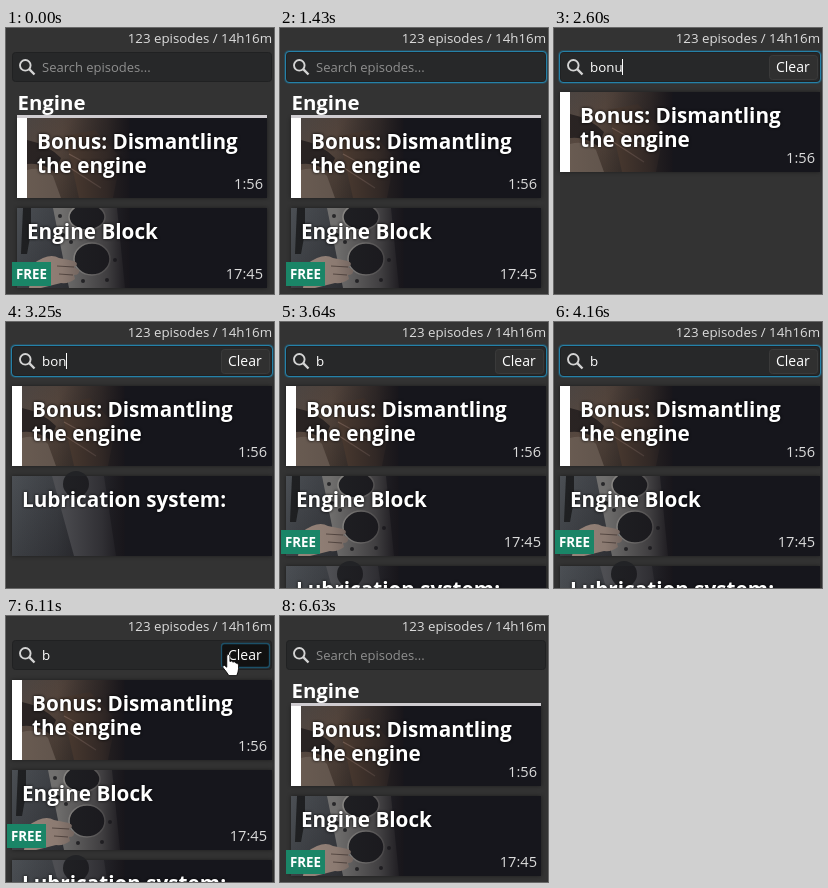
These frames come from a looping animation (268 by 266 pixels, 7.02 s). An HTML page:

```html
<!DOCTYPE html>
<html lang="en">
<head>
<meta charset="utf-8">
<title>Episode search</title>
<style>
html, body { margin: 0; width: 100%; height: 100%; overflow: hidden; background: #333; }
svg { display: block; width: 100vw; height: 100vh; }
text { font: 13.3px "Open Sans", "Noto Sans", sans-serif; fill: #dcdcdc; white-space: pre; }
.title { font-size: 20.7px; font-weight: 700; fill: #fff; filter: drop-shadow(0 0 1.5px #000); }
.time { font-size: 14.6px; text-anchor: end; }
.free { font-size: 13.3px; font-weight: 700; fill: #fff; }
.typed { fill: #fff; font-weight: 500; }
.clear { font-size: 14px; font-weight: 500; fill: #fff; }

/* Everything shares one 7020 ms clock and changes in hard steps. */
.t { animation: 7020ms step-end infinite; }
.home { animation-name: home; }
.results { animation-name: results; }
.block { animation-name: block; }
.lub { animation-name: lub; }
.third { animation-name: third; }
.o { animation-name: o; }
.n { animation-name: n; }
.u { animation-name: u; }
.caret { animation-name: caret, caret-x; }
.ring { animation-name: ring; }
.press { animation-name: press; }
.arrow { animation-name: arrow; }
.hand { animation-name: hand; }

@keyframes home { 0%, 88.88% { visibility: visible } 25.92% { visibility: hidden } }
@keyframes results { 0%, 88.88% { visibility: hidden } 25.92% { visibility: visible } }
@keyframes block { 0%, 88.88% { visibility: hidden } 51.85% { visibility: visible } }
@keyframes lub {
  0%, 88.88% { visibility: hidden; transform: translate(6px, 154px) }
  25.92%, 46.29% { visibility: visible; transform: translate(6px, 154px) }
  37.03% { visibility: hidden; transform: translate(6px, 154px) }
  51.85% { visibility: visible; transform: translate(6px, 244px) }
}
@keyframes third { 0%, 31.48%, 51.85% { visibility: hidden } 25.92%, 48.14% { visibility: visible } }
@keyframes o { 0%, 51.85% { visibility: hidden } 25.92% { visibility: visible } }
@keyframes n { 0%, 48.14% { visibility: hidden } 29.62% { visibility: visible } }
@keyframes u { 0%, 46.29% { visibility: hidden } 37.03% { visibility: visible } }
@keyframes caret {
  0%, 20.37%, 44.44%, 51.85%, 59.25%, 74.07%, 87.03% { opacity: 0 }
  12.96%, 25.92%, 46.29%, 53.7%, 66.66%, 81.48% { opacity: 1 }
}
@keyframes caret-x {
  0% { transform: translateX(36px) }
  25.92%, 48.14% { transform: translateX(52px) }
  29.62%, 46.29% { transform: translateX(60px) }
  37.03% { transform: translateX(68px) }
  51.85% { transform: translateX(44px) }
}
@keyframes ring { 0%, 87.03% { opacity: 0 } 12.96% { opacity: 1 } }
@keyframes press { 0%, 88.88% { opacity: 0 } 87.03% { opacity: 1 } }
@keyframes arrow {
  0%, 7.4% { opacity: 0; transform: translate(150px, -12px) }
  1.85% { opacity: 1; transform: translate(150px, -8px) }
  3.7% { opacity: 1; transform: translate(142px, 2px) }
  5.55% { opacity: 1; transform: translate(133px, 13px) }
}
@keyframes hand {
  0%, 88.88% { opacity: 0; transform: translate(216px, 37px) }
  81.48% { opacity: 1; transform: translate(250px, 112px) }
  83.33% { opacity: 1; transform: translate(232px, 66px) }
  85.18% { opacity: 1; transform: translate(218px, 40px) }
  87.03% { opacity: 1; transform: translate(216px, 37px) }
}
</style>
</head>
<body>
<svg viewBox="0 0 268 266" preserveAspectRatio="none">
  <defs>
    <linearGradient id="fade">
      <stop offset="0" stop-color="#18161b" stop-opacity="0"/>
      <stop offset=".4" stop-color="#18161b" stop-opacity=".12"/>
      <stop offset=".8" stop-color="#18161b" stop-opacity=".6"/>
      <stop offset="1" stop-color="#18161b"/>
    </linearGradient>
    <linearGradient id="wood" x2="1" y2=".5">
      <stop offset="0" stop-color="#4a4543"/>
      <stop offset=".4" stop-color="#5a4a40"/>
      <stop offset="1" stop-color="#3a3029"/>
    </linearGradient>
    <linearGradient id="steel" x2="1" y2=".6">
      <stop offset="0" stop-color="#4b4f54"/>
      <stop offset="1" stop-color="#2b2c30"/>
    </linearGradient>
    <clipPath id="photo"><rect width="112" height="80"/></clipPath>
    <filter id="shade" x="-10%" y="-20%" width="120%" height="140%">
      <feDropShadow dx="0" dy="0" stdDeviation="2" flood-opacity=".45"/>
    </filter>

    <g id="bonus-photo" clip-path="url(#photo)">
      <rect width="112" height="80" fill="url(#wood)"/>
      <path d="M10 22Q30 26 44 40L38 54Q24 44 10 46Z" fill="#2a2423"/>
      <path d="M10 80V52Q26 48 36 58L44 80Z" fill="#6b5d53"/>
      <path d="M48 18L78 12 104 40 96 80H62Z" fill="#574335"/>
      <path d="M44 44L84 70M52 36L92 58" stroke="#84695a" stroke-width="1.2"/>
    </g>
    <g id="block-photo" clip-path="url(#photo)">
      <rect width="112" height="80" fill="url(#steel)"/>
      <path d="M6 0H14V24L10 46H4Z" fill="#1f2022"/>
      <path d="M36 0H100L108 80H52Z" fill="#7b7a78"/>
      <g fill="#202124" stroke="#a3a19c" stroke-width="1.5">
        <ellipse cx="70" cy="9" rx="18" ry="13"/>
        <ellipse cx="75" cy="51" rx="18" ry="16"/>
      </g>
      <g fill="#2a2a2c">
        <circle cx="43" cy="8" r="2"/><circle cx="46" cy="27" r="2"/>
        <circle cx="54" cy="34" r="2"/><circle cx="70" cy="29" r="2"/>
        <circle cx="92" cy="29" r="2"/><circle cx="98" cy="52" r="2"/>
        <circle cx="66" cy="73" r="2"/><circle cx="90" cy="72" r="2"/>
      </g>
      <path d="M16 56Q32 44 42 50L57 53Q63 56 57 59L62 62Q63 67 57 67L58 71Q52 76 44 75L24 80H12Z" fill="#9b887d"/>
      <path d="M40 58L57 59M42 66L56 67" stroke="#5d4e47"/>
    </g>

    <g id="bonus">
      <use href="#bonus-photo"/>
      <rect width="112.5" height="80" fill="url(#fade)"/>
      <rect width="10" height="80" fill="#fff"/>
      <text class="title" x="20" y="31">Bonus: Dismantling</text>
      <text class="title" x="20" y="55">the engine</text>
    </g>
    <g id="engine-block">
      <use href="#block-photo"/>
      <rect width="112.5" height="80" fill="url(#fade)"/>
      <text class="title" x="10" y="31">Engine Block</text>
      <rect x="-5" y="54" width="39" height="24" fill="#1a8567"/>
      <text class="free" x="-1" y="71">FREE</text>
    </g>
    <g id="plate">
      <rect width="260" height="80" fill="#18161b" filter="url(#shade)"/>
    </g>
    <g id="metal">
      <use href="#plate"/>
      <rect width="112" height="80" fill="url(#steel)"/>
      <path d="M40 0H92L104 80H62Z" fill="#55565a"/>
      <circle cx="64" cy="8" r="13" fill="#222326"/>
      <rect width="112.5" height="80" fill="url(#fade)"/>
    </g>
    <g id="plate-home">
      <rect width="250" height="80" fill="#18161b" filter="url(#shade)"/>
    </g>
  </defs>

  <rect width="268" height="266" fill="#333"/>
  <text x="266" y="15" text-anchor="end">123 episodes / 14h16m</text>

  <rect x="6.5" y="24.5" width="259" height="29" rx="3" fill="#272829" stroke="#202122"/>
  <g class="t ring" fill="none">
    <rect x="5" y="23" width="262" height="32" rx="4" stroke="#1d6f96" stroke-opacity=".35" stroke-width="2"/>
    <rect x="5.5" y="23.5" width="261" height="31" rx="3.5" stroke="#2581a8"/>
  </g>
  <g fill="none" stroke="#d4d4d4" stroke-width="1.9">
    <circle cx="19.3" cy="37.3" r="5.3"/>
    <path d="M23.2 41.2L28.5 46.5" stroke-width="2.4"/>
  </g>

  <g class="t home">
    <text x="36" y="44" style="font-size:13px;fill:#8f8f8f">Search episodes...</text>
    <text x="11.5" y="82" style="font-size:20.4px;font-weight:700;fill:#fff">Engine</text>
    <g transform="translate(11 90)">
      <use href="#plate-home"/>
      <use href="#bonus"/>
      <text class="time" x="246" y="71">1:56</text>
    </g>
    <rect x="11" y="87" width="250" height="3" fill="#cfccd0"/>
    <g transform="translate(11 180)">
      <use href="#plate-home"/>
      <use href="#engine-block"/>
      <text class="time" x="246" y="71">17:45</text>
    </g>
  </g>

  <g class="t results">
    <text class="typed" x="36" y="44">b<tspan class="t o">o</tspan><tspan class="t n">n</tspan><tspan class="t u">u</tspan></text>
    <rect x="215.5" y="27.5" width="48" height="24" rx="3" fill="#303030" stroke="#3a3a3a"/>
    <rect class="t press" x="215.5" y="27.5" width="48" height="24" rx="3" fill="#111" stroke="#1c5068" stroke-width="1.3"/>
    <text class="clear" x="222" y="44">Clear</text>

    <g transform="translate(6 64)">
      <use href="#plate"/>
      <use href="#bonus"/>
      <text class="time" x="255" y="71">1:56</text>
    </g>
    <g class="t block" transform="translate(6 154)">
      <use href="#plate"/>
      <use href="#engine-block"/>
      <text class="time" x="255" y="71">17:45</text>
    </g>
    <g class="t third" transform="translate(6 244)">
      <use href="#metal"/>
    </g>
    <g class="t lub">
      <use href="#metal"/>
      <text class="title" x="10" y="31">Lubrication system:</text>
    </g>
  </g>

  <rect class="t caret" y="31" width="1" height="16" fill="#fff"/>

  <path class="t arrow" d="M.5 .5V16L4 12.7 6.5 18.2 9 17 6.6 11.8H11.5Z" fill="#fff" stroke="#000" stroke-width=".8"/>
  <g class="t hand">
    <path transform="scale(1.05)" d="M4.500 2.500Q6 0 7.500 2.500V8Q9.500 6.800 10.300 8.600 12.500 7.500 13.200 9.600 15.500 9 15.700 11.500V15Q15.500 18 14 21.500H6.500Q4 17.500 1 14 0 11.500 2 11.500L4.500 13.500Z" fill="#fff" stroke="#000" stroke-width=".8"/>
  </g>
</svg>
</body>
</html>
```
